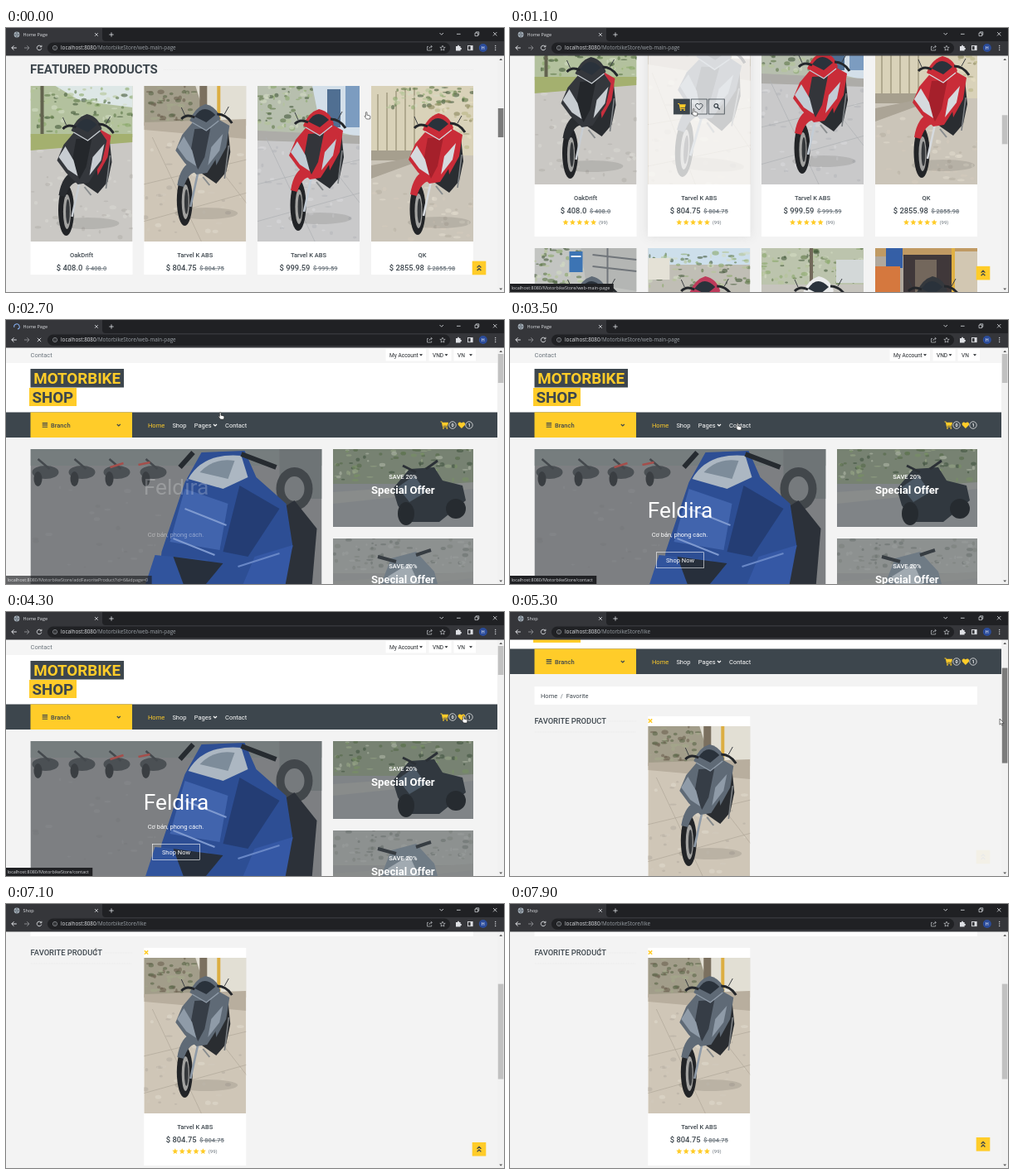
Write an HTML page that moves like this. It is 600 by 319 pixels and loops after 8 s.

```html
<!DOCTYPE html>
<html lang="en">
<head>
<meta charset="utf-8">
<title>Motorbike shop</title>
<style>
html, body { margin: 0; width: 100%; height: 100%; overflow: hidden; background: #f3f3f3; }
svg { display: block; }
#stage { width: 600px; height: 319px; }
text { font-family: Roboto, Arial, sans-serif; white-space: pre; }
.ui { font-family: "Open Sans", "Noto Sans", sans-serif; }
.shade { filter: drop-shadow(0 0 6px #ddd); }
</style>
</head>
<body>
<svg id="stage" viewBox="0 0 600 319" xmlns="http://www.w3.org/2000/svg"></svg>
<script>
const YELLOW = '#ffcc29', DARK = '#3d464d', PAGE = '#f3f3f3', MUTED = '#6c757d';
const LOOP = 8000;
const RELOAD = 2400, LIKE = 4700;

// ---------- drawing helpers ----------
const rect = (x, y, w, h, fill, more = '') =>
  `<rect x="${x}" y="${y}" width="${w}" height="${h}" fill="${fill}" ${more}/>`;
const path = (d, fill, more = '') => `<path d="${d}" fill="${fill}" ${more}/>`;
const line = (d, color, width = 1, more = '') =>
  `<path d="${d}" fill="none" stroke="${color}" stroke-width="${width}" ${more}/>`;
const oval = (x, y, rx, ry, fill, more = '') =>
  `<ellipse cx="${x}" cy="${y}" rx="${rx}" ry="${ry}" fill="${fill}" ${more}/>`;
const at = (x, y, body, more = '') => `<g transform="translate(${x} ${y})" ${more}>${body}</g>`;
const text = (x, y, s, size, fill, weight = 400, more = '') =>
  `<text x="${x}" y="${y}" font-size="${size}" fill="${fill}" font-weight="${weight}" ${more}>${s}</text>`;
const MID = 'text-anchor="middle"';
const frame = (x, y, w, h, body) => `<svg x="${x}" y="${y}" width="${w}" height="${h}">${body}</svg>`;

function random(seed) {
  return () => (seed = (seed * 16807) % 2147483647) / 2147483647;
}
function specks(seed, n, x, y, w, h, colors) {
  const r = random(seed * 7919);
  let out = '';
  for (let i = 0; i < n; i++) {
    out += oval((x + r() * w).toFixed(1), (y + r() * h).toFixed(1), (1 + r() * 3.4).toFixed(1),
      (.7 + r() * 2).toFixed(1), colors[i % colors.length], 'opacity=".6"');
  }
  return out;
}

// ---------- icons ----------
const cart = fill => path('M0 0H1.8L2.2 1.2H9.5L8.5 5.2H3.2L3.4 6H8.6V7H2.6L1.3 1H0Z', fill) +
  oval(3.5, 8.2, .9, .9, fill) + oval(7.8, 8.2, .9, .9, fill);
const HEART = 'M4.5 8 .8 4.2C-1 1.8 2-1.2 4.5 1.4 7-1.2 10 1.8 8.2 4.2Z';
const lens = color => `<circle cx="3" cy="3" r="2.3" fill="none" stroke="${color}" stroke-width="1.3"/>` +
  line('M4.8 4.8 7.4 7.4', color, 1.5);
const chevron = (x, y, color, s = 2) => line(`M${x - s} ${y - s / 2}l${s} ${s}l${s} ${-s}`, color, 1.2);
const star = (x, y) => {
  let d = '';
  for (let i = 0; i < 10; i++) {
    const r = i % 2 ? 1.7 : 3.7, a = Math.PI * (i / 5 - .5);
    d += (i ? 'L' : 'M') + (x + r * Math.cos(a)).toFixed(2) + ' ' + (y + r * Math.sin(a)).toFixed(2);
  }
  return path(d + 'Z', YELLOW);
};

// ---------- photos ----------
function scooter({ body, mid, light, side = body, fender = body }) {
  return oval(70, 166, 38, 7, '#000', 'opacity=".1"') +
    path('M80 54 96 62 99 92 94 116 82 130 62 116Z', '#2a2d31') + path('M84 52 98 60 94 86 82 108 78 76Z', side) +
    line('M97 84 92 124', '#7b7f82', 1.6) + line('M66 122 74 132', '#888c8e', 2) +
    oval(44, 150, 9.5, 31, '#222427') + oval(45, 152, 4.6, 21, '#a2a2a0') + oval(46, 152, 2.4, 15, '#35383b') +
    line('M61 112 51 158', light, 2.6) +
    path('M35 132Q39 107 54 103L62 116Q49 114 43 134Z', fender) +
    path('M33 90 41 71 57 52 81 49 93 66 87 92 71 117 58 119 44 105Z', body) +
    path('M56 64 75 63 68 98 60 113 51 92Z', mid) +
    path('M35 86 43 73 53 90 58 109 46 101Z', light) + path('M90 70 86 90 72 108 76 86Z', light) +
    path('M50 54Q56 38 69 34Q83 37 87 52L70 66Z', body) + path('M56 49Q67 32 81 47L70 56Z', '#2a323b') +
    line('M53 56 70 66 85 54', light, 1.4) +
    line('M40 52Q46 45 56 50M83 46Q94 46 101 57', '#24272b', 3) + line('M44 47 40 38M92 46 97 37', '#3a3e43', 1);
}
const GREENS = ['#5d7746', '#8ba86a', '#d3dcc3', '#43593a', '#b4c597'];
const STONE = ['#e0d9cc', '#b8b0a4', '#d3cabc'];
const tiles = color => line('M-5 120 128 88M-5 165 128 128M10 62 70 190M60 60 130 150', color, .7);
const RED = { body: '#c92c38', mid: '#33353a', light: '#c3ccd5' };
const SILVER = { body: '#5f6a76', mid: '#363d46', light: '#8f9ba8' };

const scenes = {
  park: rect(0, 0, 123, 188, '#cac8c4') + rect(0, 0, 123, 62, '#b3c19e') + path('M30 0H123V26L60 18Z', '#dde7e6') +
    specks(3, 110, 0, 0, 123, 58, GREENS) + rect(12, 0, 4, 60, '#63634f') + path('M0 58H123V68L0 78Z', '#a4b06f') +
    specks(5, 60, 0, 78, 123, 105, ['#d9d7d3', '#b6b3ae']) +
    at(-1, 0, scooter({ body: '#34373c', mid: '#24272b', light: '#c8cdd2', side: '#c72f3d', fender: '#292c30' })),
  yard: rect(0, 0, 123, 188, '#cfc6b7') + rect(0, 0, 123, 48, '#a29d8a') +
    specks(9, 60, 0, 0, 62, 42, ['#5b6649', '#a4a98b', '#6d6250']) +
    path('M62 0H123V48L74 38Z', '#e2dfd4') + rect(88, 0, 4, 44, '#dcae42') +
    rect(67, 0, 9, 34, '#7b705f') + path('M0 44 123 40V64L0 53Z', '#b8ae9e') +
    specks(11, 55, 0, 66, 123, 114, STONE) + tiles('#b1a89a') + at(5, -12, scooter(SILVER)),
  street: rect(0, 0, 123, 188, '#c9c9ca') + rect(0, 0, 123, 60, '#b7bfae') +
    specks(15, 65, 0, 0, 66, 52, GREENS) + path('M66 0H123V62L76 50Z', '#d3dfe9') +
    rect(84, 4, 16, 46, '#506f92') + rect(106, 0, 17, 50, '#7c9cc0') + path('M0 54 123 60V70L0 66Z', '#adaca8') +
    specks(17, 50, 0, 74, 123, 110, ['#d9d9db', '#b6b7ba']) + tiles('#aeb0b3') + at(5, -6, scooter(RED)),
  lane: rect(0, 0, 123, 188, '#cbc5b9') + rect(0, 0, 123, 84, '#d9d2b9') +
    line('M8 10V80M19 8V80M30 6V80M41 4V80M52 2V80', '#b0a98f', 2) + rect(0, 78, 60, 12, '#a69f8e') +
    specks(21, 70, 20, 0, 103, 26, GREENS) + specks(23, 45, 72, 16, 51, 60, ['#b9b585', '#e8dfc3', '#88865a']) +
    path('M0 96 60 84V90L0 112Z', '#aba496') + specks(25, 55, 0, 108, 123, 78, STONE) +
    at(12, -1, scooter({ ...RED, mid: '#a5202b', light: '#d6dade' })),
  gate: rect(0, 0, 123, 188, '#c3c5c2') + specks(31, 70, 0, 0, 60, 55, GREENS) +
    path('M56 0H123V52L62 42Z', '#b4b6b4') + rect(42, 4, 16, 25, '#3c74b4') + rect(44, 9, 12, 2, '#e4edf6') +
    line('M70 8 123 14M70 22 123 28M88 0V48', '#70757a', 2) + scooter(SILVER),
  garden: rect(0, 0, 123, 188, '#c0beb5') + rect(0, 0, 123, 20, '#cddfeb') +
    specks(35, 95, 0, 4, 123, 42, GREENS) + rect(0, 12, 26, 26, '#e4e1d6') +
    scooter({ body: '#bd3a5a', mid: '#77293e', light: '#e6d5d9' }),
  trees: rect(0, 0, 123, 188, '#c6c4bd') + rect(0, 0, 123, 44, '#bcc4ad') + specks(39, 95, 0, 0, 123, 42, GREENS) +
    rect(58, 0, 4, 40, '#72695a') + rect(90, 14, 33, 28, '#d3d8d8') +
    scooter({ body: '#ebecec', mid: '#9b9fa2', light: '#fff' }),
  door: rect(0, 0, 123, 188, '#b0a89d') + rect(0, 0, 123, 10, '#c09a63') + rect(34, 8, 58, 60, '#40383a') +
    rect(48, 14, 26, 54, '#73675c') + rect(13, 0, 20, 24, '#355fa6') + rect(0, 22, 30, 44, '#d5783e') +
    rect(96, 4, 27, 60, '#d2c7b2') + rect(92, 0, 4, 60, '#e0b144') +
    scooter({ body: '#34383d', mid: '#1f2225', light: '#a8adb2' })
};

const heroPhoto = rect(0, 0, 351, 202, '#858688') + specks(43, 70, 0, 45, 350, 155, ['#8e8f91', '#7d7f81']) +
  rect(0, 0, 351, 20, '#7d8383') +
  [18, 62, 104, 148].map(x => oval(x, 28, 16, 8, '#4d5155') + oval(x - 9, 36, 5, 9, '#3a3d41') +
    line(`M${x - 9} 12l14 12`, '#45494d', 2.5)).join('') +
  line('M96 22 112 17M130 19 144 16', '#b0504c', 2.5) + rect(300, 0, 51, 60, '#74797a') +
  oval(318, 48, 22, 26, '#43474b') + oval(318, 48, 12, 15, '#7d8082') +
  path('M205 202 262 98 318 62 345 96 336 202Z', '#2a2f36') +
  path('M186 40 206 4 258 2 272 34 308 66 316 118 276 202H150L158 124Z', '#2b4f9c') +
  path('M186 48 238 66 228 122 168 112Z', '#4268b8') +
  path('M252 44 300 72 262 130 232 124Z', '#213c78') +
  path('M150 128 214 134 192 172 142 202H126Z', '#3056a6') +
  path('M172 130 232 138 204 172 186 168Z', '#252d39') +
  path('M190 36Q208 4 254 8L262 34 232 48Z', '#b9c4cf') + path('M204 28Q220 10 246 14L238 36Z', '#8594a3') +
  line('M180 22 196 4M254 6 296 22', '#24282d', 6) + line('M186 72 236 92M172 108 222 128', '#86a3de', 2) +
  path('M270 130 316 116 306 170 280 202H240Z', '#345aaf') + line('M250 142 300 126', '#6e8fd4', 2) +
  rect(0, 0, 351, 202, DARK, 'opacity=".1"');

const offerPhoto = (ground, top, seed, bike, colors) => rect(0, 0, 169, 94, ground) + rect(0, 0, 169, 42, top) +
  specks(seed, 80, 0, 0, 169, 38, colors) + path('M0 52 169 40V48L0 66Z', '#a2a4a0') + bike +
  rect(0, 0, 169, 94, DARK, 'opacity=".25"');
const offers = [
  offerPhoto('#97999a', '#8b977f', 51,
    path('M72 48 92 24 122 22 132 38 156 44 160 62 128 88H92L78 68Z', '#2d343b') +
    path('M78 46 98 32 112 52 92 64Z', '#51606e') + oval(88, 78, 10, 14, '#1f2327') + oval(148, 72, 12, 12, '#1f2327') +
    line('M84 20 100 28M112 24 126 14', '#25292e', 3), GREENS),
  offerPhoto('#9f a09e'.replace(' ', ''), '#a8aaa7', 53,
    path('M56 60 70 24 100 16 122 40 130 70 108 94H64Z', '#808d98') + path('M66 46 92 30 104 56 80 74Z', '#c3ccd3') +
    line('M54 22 76 28M100 20 118 14', '#353a3f', 4), ['#8f948c', '#b8bbb5', '#7a8179'])
];

// ---------- product card ----------
const product = (photo, name, price, id) => {
  const button = (i, icon) => `<g id="${id}b${i}">` +
    rect(31 + 21 * i, 85, 19, 18, DARK, `class="bg" stroke="${DARK}" stroke-width=".8" fill-opacity="0"`) +
    `<g class="icon" fill="${DARK}" stroke="${DARK}">${icon}</g></g>`;
  const hover = !id ? '' : `<rect id="${id}veil" width="123" height="188" fill="#fff"/>` +
    button(0, at(36, 90, cart('inherit'), 'stroke="none"')) +
    button(1, at(57, 90, line(HEART, 'inherit'))) +
    button(2, at(79, 90, lens('inherit')));
  return (id ? rect(0, 0, 123, 251, '#fff', `id="${id}shade" class="shade"`) : '') + rect(0, 0, 123, 251, '#fff') +
    frame(0, 0, 123, 188, `<g ${id ? `id="${id}zoom"` : ''}>${photo}</g>` + hover) +
    text(61.5, 207.3, name, 7.5, DARK, 500, MID) +
    `<text x="61.5" y="223" font-size="9.375" font-weight="500" fill="${DARK}" ${MID}>$ ${price}` +
    `<tspan dx="3.5" font-size="7.5" fill="${MUTED}" text-decoration="line-through">$ ${price}</tspan></text>` +
    [0, 1, 2, 3, 4].map(i => star(37.5 + 8.4 * i, 234)).join('') +
    text(77.5, 236.2, '(99)', 6, MUTED);
};
const COLS = [29.5, 166.3, 303, 440];

// ---------- page parts ----------
const dropdown = (x, w, s) => rect(x, 35, w, 14.5, '#fff') + text(x + 4.5, 44.9, s, 6.56, '#212529') +
  path(`M${x + w - 8} 41.3h4l-2 2.2z`, '#212529');
const badge = (x, s) => `<circle cx="${x}" cy="127" r="4.2" fill="none" stroke="#fff" stroke-width=".7"/>` +
  text(x, 129.1, s, 5.6, '#fff', 700, MID);
const header = rect(0, 33, 592, 19, '#f5f5f5') + text(29.5, 45, 'Contact', 7.5, MUTED) +
  dropdown(457.5, 48.5, 'My Account') + dropdown(509.5, 27, 'VND') + dropdown(539.5, 26.5, 'VN') +
  rect(0, 52, 592, 60, '#fff') +
  rect(29.5, 59, 112.5, 22.5, DARK) + text(85.7, 77, 'MOTORBIKE', 18.75, YELLOW, 700, MID) +
  rect(28, 82, 57, 22, YELLOW) + text(56.3, 99.7, 'SHOP', 18.75, DARK, 700, MID) +
  rect(0, 111.5, 592, 30.5, DARK) + rect(29.5, 111.5, 122.5, 30.5, YELLOW) +
  line('M43.7 124.6h6.4M43.7 126.9h6.4M43.7 129.2h6.4', DARK, 1.1) + text(54, 129.6, 'Branch', 7.5, DARK, 500) +
  chevron(135.8, 127, DARK) + text(171, 129.6, 'Home', 7.5, YELLOW) + text(200.4, 129.6, 'Shop', 7.5, '#fff') +
  text(226.8, 129.6, 'Pages', 7.5, '#fff') + chevron(252, 127, '#fff') + text(264, 129.6, 'Contact', 7.5, '#fff') +
  at(523.5, 122.6, cart(YELLOW)) + badge(538, '0') + at(544.4, 123, path(HEART, YELLOW)) + badge(558, '1');

const hero = frame(29.5, 156, 351, 202, heroPhoto) +
  `<g id="title">${text(205, 239, 'Feldira', 26.25, '#fff', 400, MID)}</g>` +
  `<g id="lead">${text(204.5, 261.7, 'Cơ bản, phong cách.', 7.5, '#fff', 400, MID)}</g>` +
  `<g id="shopNow">${rect(176.5, 280.5, 57, 19, 'none', 'stroke="#fff" stroke-width=".6"')}` +
  text(205, 292.7, 'Shop Now', 7.5, '#fff', 400, MID) + '</g>' +
  offers.map((o, i) => at(394, 156 + 108 * i, frame(0, 0, 169, 94, o) +
    text(84.3, 35.7, 'SAVE 20%', 7.5, '#fff', 500, MID) +
    text(84.3, 53.7, 'Special Offer', 13.1, '#fff', 700, MID))).join('');

const grid = text(29, 522, 'FEATURED PRODUCTS', 15, DARK, 700) +
  line('M190 517.5H563', '#e9e9e9', .7, 'stroke-dasharray="1 1"') +
  [['park', 'OakDrift', '408.0'], ['yard', 'Tarvel K ABS', '804.75', 'm'],
   ['street', 'Tarvel K ABS', '999.59'], ['lane', 'QK', '2855.98']]
    .map(([s, name, price, id], i) => at(COLS[i], 537, product(scenes[s], name, price, id))).join('') +
  ['gate', 'garden', 'trees', 'door'].map((s, i) => at(COLS[i], 802, frame(0, 0, 123, 188, scenes[s]))).join('');

const likePage = header + rect(29.5, 157, 533.5, 22, '#fff') + text(37, 170.6, 'Home', 7.5, DARK) +
  text(60.8, 170.6, '/', 7.5, MUTED) + text(67.7, 170.6, 'Favorite', 7.5, DARK) +
  text(29.5, 202.3, 'FAVORITE PRODUCT', 9.375, DARK, 500) +
  line('M119 199H152M30 212H152', '#e3e3e3', .7, 'stroke-dasharray="1 1"') +
  at(166.3, 205, product(scenes.yard, 'Tarvel K ABS', '804.75', 'f')) +
  rect(166.3, 193, 123, 12, '#fff') + line('M166.8 196.4l4.4 4.4m0-4.4l-4.4 4.4', YELLOW, 1.5);

// ---------- browser ----------
const W = '#dfe1e5';
const browser = rect(0, 0, 600, 33.5, '#35363a') + path('M116 0H600V16H120Q116 16 116 12Z', '#202124') +
  `<g id="globe">${oval(13, 8, 3.4, 3.4, '#aab4bd')}${line('M9.8 8h6.4M13 4.8q-3 3.2 0 6.4q3-3.2 0-6.4', '#4b555e', .6)}</g>` +
  `<g id="spin">${line('M13 4.8A3.2 3.2 0 1 1 9.8 8', '#8ab4f8', 1)}</g>` +
  `<text id="tab" class="ui" x="20.5" y="10.2" font-size="5.5" fill="${W}"></text>` +
  line('M107 6l3.8 3.8m0-3.8l-3.8 3.8M124.3 8h5.4M127 5.3v5.4', W, .8) +
  line('M522.5 6l2.2 2.2L527 6M543 7.3h4.6M587 5l4.4 4.4m0-4.4L587 9.4', W, .8) +
  line('M565 6h3.6v3.6H565zM566.3 6V4.8h3.5v3.5h-1.2', W, .7) +
  line('M12.8 24H6.8m2.7-2.7L6.8 24l2.7 2.7', W, 1) + line('M22 24h6m-2.7-2.7L28 24l-2.7 2.7', '#85878b', 1) +
  `<g id="reload">${line('M42.4 22.4A2.8 2.8 0 1 0 42.8 24.6M42.9 20.8v2h-2', W, .9)}</g>` +
  `<g id="stop">${line('M37.8 21.8l4.4 4.4m0-4.4l-4.4 4.4', W, .9)}</g>` +
  rect(50, 17.5, 485, 13.5, '#202124', 'rx="6.7"') +
  `<circle cx="59" cy="24" r="2.6" fill="none" stroke="#a0a4a8" stroke-width=".7"/>` + line('M59 23.6v1.8M59 22.4v.5', '#a0a4a8', .7) +
  `<text class="ui" x="66" y="26.4" font-size="6.32" fill="#9aa0a6"><tspan fill="${W}">localhost:8080</tspan><tspan id="url"></tspan></text>` +
  line('M509 22.4h-1.5v4.6h5.2v-1.6M509.6 25q.4-2.6 3.6-2.6m-1.4-1.5l1.6 1.5-1.6 1.5', '#c0c3c7', .7) +
  at(526, 24.3, line('M0-3.2.9-1 3.2-.9 1.4.6 2 2.8 0 1.6-2 2.8-1.4.6-3.2-.9-.9-1Z', '#c0c3c7', .7)) +
  path('M542 22h2q0-1.6 1-1.6t1 1.6h1.6v2q1.5 0 1.5 1t-1.5 1v1.4H542z', W) +
  rect(556.5, 21.5, 5.6, 5.2, 'none', `stroke="${W}" stroke-width=".9"`) + rect(559.6, 21.5, 2.5, 5.2, W) +
  oval(574.8, 24, 5, 5, '#2b4c9b') + text(574.8, 26, 'H', 5.5, '#fff', 400, MID) +
  [21.5, 24, 26.5].map(y => oval(589.7, y, .7, .7, W)).join('');

const scrollbar = rect(592, 33.5, 8, 286, '#f1f1f1') + path('M594.3 39l1.9-2.2 1.9 2.2z', '#555') +
  path('M594.3 314.5l1.9 2.2 1.9-2.2z', '#555') + '<rect id="thumb" x="592.8" width="6.6"/>';

const stage = document.getElementById('stage');
stage.innerHTML = rect(0, 0, 600, 319, PAGE) +
  `<g id="main">${header}${hero}${grid}</g><g id="like">${likePage}</g>` +
  `<g id="fold">${rect(0, 298, 592, 21, PAGE)}</g>` +
  `<g id="toTop">${rect(561.7, 0, 16.6, 16.6, YELLOW)}${line('M567.6 7.8l2.4-2.4 2.4 2.4M567.6 11.4l2.4-2.4 2.4 2.4', DARK, 1.3)}</g>` +
  scrollbar +
  '<g id="status"><rect id="statusBox" y="309" height="10" fill="#202124"/>' +
  '<text id="statusText" class="ui" x="1.5" y="315.8" font-size="5.42" fill="#d8dadd"></text></g>' + browser +
  `<g id="hand">${path('M2 .5q1 0 1 1v2.7l3 .7q1 .3.9 1.3L6.5 9H2.4L0 5.7l.5-.6.9.6V1.5q0-1 .6-1z', '#fff', 'stroke="#222" stroke-width=".6"')}</g>` +
  `<g id="arrow">${path('M0 0V7.2L1.7 5.7 2.8 8.2 3.9 7.7 2.8 5.3H5Z', '#fff', 'stroke="#222" stroke-width=".6"')}</g>` +
  `<g id="beam">${line('M0 0h2.4M1.2 0v7M0 7h2.4', '#555', .6)}</g>`;

// ---------- motion ----------
const el = id => document.getElementById(id);
const set = (id, name, value) => el(id).setAttribute(name, value);
const show = (id, on) => set(id, 'display', on ? 'inline' : 'none');
const move = (id, x, y) => set(id, 'transform', `translate(${x} ${y})`);
const clamp = v => Math.max(0, Math.min(1, v));
const ramp = (t, from, length) => clamp((t - from) / length);

// Eased value between rows of [time, ...values].
function track(t, rows) {
  let i = 0;
  while (i < rows.length - 2 && t >= rows[i + 1][0]) i++;
  const [a, b] = [rows[i], rows[i + 1]];
  const p = ramp(t, a[0], b[0] - a[0]), e = p * p * (3 - 2 * p);
  return a.slice(1).map((v, k) => v + (b[k + 1] - v) * e);
}

const mainScroll = [[100, 467], [600, 536]];
const likeScroll = [[4900, 0], [5300, 67], [5650, 140]];
const pointer = [[150, 432, 101], [800, 204, 93], [1000, 208, 94], [1100, 219, 97], [1300, 226, 97], [2000, 228, 97],
  [2650, 256, 111], [3000, 256, 111], [3500, 272, 124], [3800, 276, 125], [4250, 549, 125], [4600, 549, 125],
  [4900, 590, 102], [5300, 590, 129], [5650, 590, 158], [6100, 235, 160], [6370, 153, 118], [6600, 153, 118],
  [7100, 107, 54]];
const ROOT = 'localhost:8080/MotorbikeStore/';
const links = [[0, ''], [650, 'web-main-page'], [1250, 'addFavoriteProduct?id=6&idpage=0'], [2850, ''],
  [3250, 'web-main-page'], [3500, 'contact'], [4400, 'like'], [LIKE, '']];

function hover(id, t, enter, leave) {
  const a = Math.min(ramp(t, enter, 300), 1 - ramp(t, leave, 500));
  set(id + 'shade', 'opacity', a);
  set(id + 'veil', 'opacity', .76 * a);
  set(id + 'zoom', 'transform', `translate(61.5 94) rotate(${4 * a}) scale(${1 + .15 * a}) translate(-61.5 -94)`);
  [22, 5, -45].forEach((delay, i) => {
    const v = Math.min(ramp(t, enter + 40 * i, 250), 1 - (t < leave ? 0 : ramp(t, leave + delay, 400)));
    move(id + 'b' + i, 0, 47 * (1 - v));
    set(id + 'b' + i, 'opacity', v);
  });
}
function lit(id, amount) {
  const g = el(id);
  g.querySelector('.bg').setAttribute('fill-opacity', amount);
  const color = amount > .5 ? YELLOW : DARK, icon = g.querySelector('.icon');
  icon.setAttribute('fill', color);
  icon.setAttribute('stroke', color);
}

function draw(t) {
  const liked = t >= LIKE, top = !liked && t >= RELOAD;
  const scroll = liked ? track(t, likeScroll)[0] : top ? 0 : track(t, mainScroll)[0];
  show('main', !liked);
  show('like', liked);
  move(liked ? 'like' : 'main', 0, -scroll);
  show('fold', t < 100);

  const e = 1 - Math.pow(1 - ramp(t, 2550, 1000), 1.5);
  move('title', 0, -36 * (1 - e));
  set('title', 'opacity', e);
  set('lead', 'opacity', clamp(2 * e));
  move('shopNow', 0, 21 * (1 - e));
  set('shopNow', 'opacity', clamp((e - .25) / .75));

  hover('m', t, 600, 1e9);
  lit('mb0', Math.min(ramp(t, 800, 150), 1 - ramp(t, 1120, 200)));
  lit('mb1', ramp(t, 1120, 200));
  hover('f', t, 5950, 6370);

  const u = liked ? (t - 6150) / 1000 : t / 1000 - .2;
  move('toTop', 0, 281 + 3.5 * (1 - Math.cos(Math.PI * u)));
  set('toTop', 'opacity', liked ? ramp(t, 5270, 600) : top ? 0 : 1);

  set('thumb', 'y', 41 + scroll * (liked ? .397 : .12));
  set('thumb', 'height', liked ? 115 : 35);
  set('thumb', 'fill', t < 400 || (t > 4900 && t < 5700) ? '#7b7b7b' : '#c1c1c1');

  const loading = (t > 1900 && t < 2850) || (t > 4550 && t < 4800);
  show('globe', !loading);
  show('spin', loading);
  set('spin', 'transform', `rotate(${t * .36} 13 8)`);
  show('reload', !loading);
  show('stop', loading);
  el('tab').textContent = liked ? 'Shop' : 'Home Page';
  el('url').textContent = '/MotorbikeStore/' + (liked ? 'like' : 'web-main-page');

  const link = links.filter(row => t >= row[0]).pop()[1];
  show('status', link);
  if (link) {
    el('statusText').textContent = ROOT + link;
    set('statusBox', 'width', el('statusText').getComputedTextLength() + 6);
  }
  set('status', 'opacity', t > 2600 && t < 2850 ? 1 - .8 * ramp(t, 2600, 250) : 1);

  const kind = t < LIKE ? 'hand' : t < 6900 ? 'arrow' : 'beam';
  ['hand', 'arrow', 'beam'].forEach(id => show(id, id === kind));
  move(kind, ...track(t, pointer));
}

const start = performance.now();
function tick() {
  draw((performance.now() - start) % LOOP);
  requestAnimationFrame(tick);
}
tick();
</script>
</body>
</html>
```
